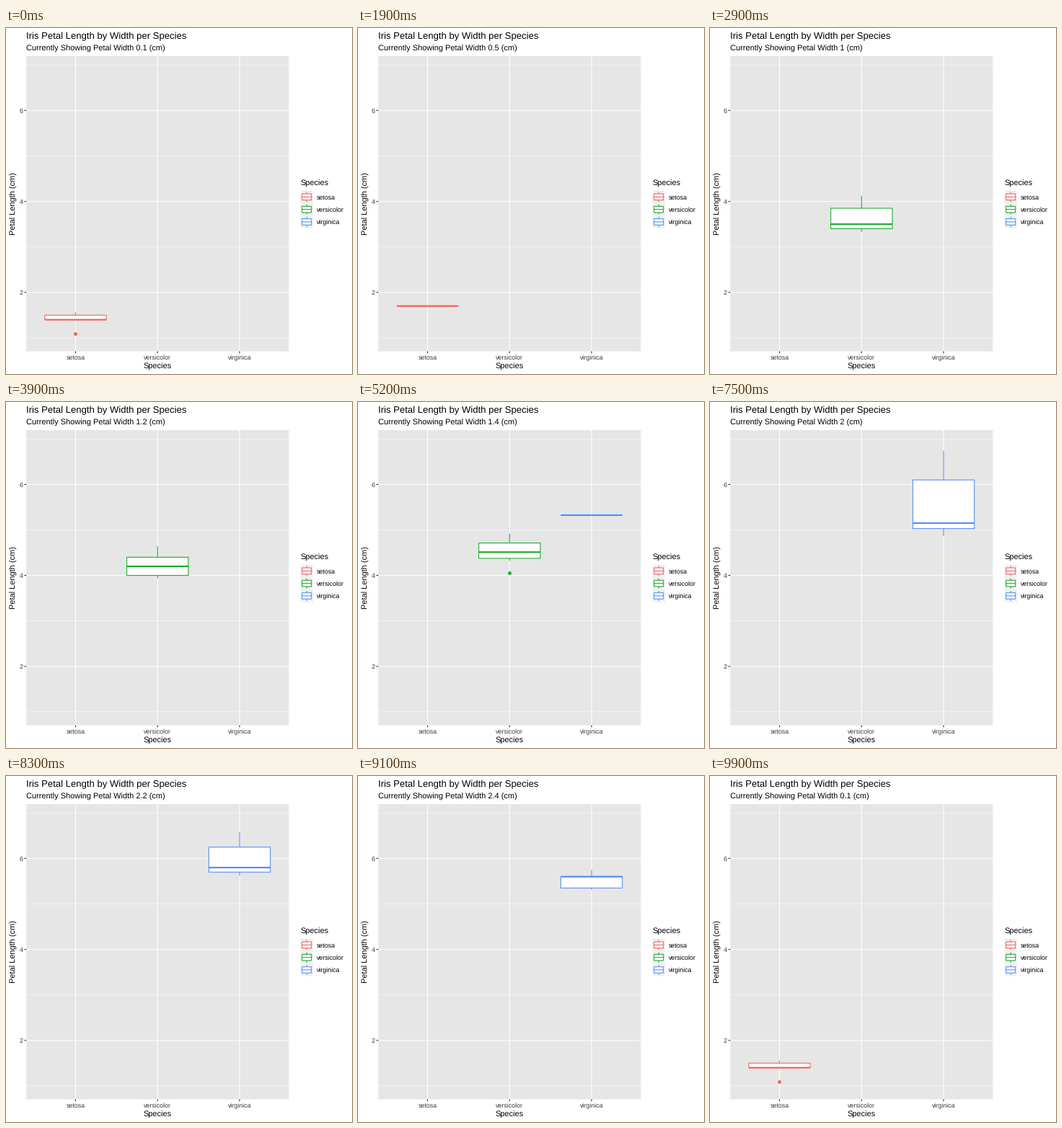
These frames come from a looping animation (480 by 480 pixels, 10000 ms). A matplotlib script:

```python
import numpy as np
import matplotlib.pyplot as plt
from matplotlib.animation import FuncAnimation
from matplotlib.patches import Rectangle

plt.rcParams.update({"font.family": "Liberation Sans", "path.snap": False,
                     "text.hinting": "none", "toolbar": "None"})

SIZE, FRAMES, INTERVAL = 480, 100, 100
LINE = 1.07
LEFT, TOP, RIGHT, BOTTOM = 28.2, 39.0, 392.3, 448.5
Y_MIN, Y_MAX = 0.705, 7.195
STEP_X = (RIGHT - LEFT) / 3.2
BOX_WIDTH = 0.75 * STEP_X
TITLE, BODY, SMALL = 13.15, 10.97, 8.9
COLORS = {"setosa": "#f1635a", "versicolor": "#16ac2a", "virginica": "#538dfb"}

# Key boxes by petal width in tenths of a cm: (q1, median, q3) or one flat value
KEY_BOXES = {
    "setosa": {1: (1.4, 1.4, 1.5), 3: (1.4, 1.4, 1.5), 5: 1.7, 6: 1.6},
    "versicolor": {10: (3.4, 3.5, 3.85), 12: (4.0, 4.2, 4.4),
                   16: (4.6, 4.7, 4.9), 17: 5.0, 18: 4.8},
    "virginica": {14: 5.6, 15: 5.05, 16: 5.8, 17: 4.5, 18: (4.9, 5.5, 5.7),
                  19: (5.1, 5.1, 5.3), 20: (5.03, 5.15, 6.1),
                  22: (5.7, 5.8, 6.25), 24: (5.35, 5.6, 5.6), 25: (5.85, 6.0, 6.05)},
}
OUTLIERS = {
    "setosa": {1: [1.1], 2: [1.0, 1.2, 1.7, 1.9], 3: [1.7], 4: [1.9]},
    "versicolor": {14: [3.9], 15: [4.2]},
    "virginica": {19: [6.1], 21: [6.6]},
}
WIDTHS = [*range(1, 7), *range(10, 26)]
# Frames that lie halfway between two petal widths
TWEENS = [*range(3, 49, 5), 52, 57, *range(62, 99, 4)]


def x_pos(index):
    return LEFT + (0.6 + index) * STEP_X


def y_pos(value):
    return BOTTOM - (np.asarray(value) - Y_MIN) / (Y_MAX - Y_MIN) * (BOTTOM - TOP)


def box_at(name, width):
    """Return (low, q1, median, q3, high) and outliers, or None outside the range."""
    keys = KEY_BOXES[name]
    widths = list(keys)
    if not widths[0] <= width <= widths[-1]:
        return None
    boxes = np.array([np.broadcast_to(box, 3) for box in keys.values()])
    q1, median, q3 = (np.interp(width, widths, column) for column in boxes.T)
    iqr = q3 - q1
    box = np.array([q1 - 0.15 * iqr, q1, median, q3, q3 + 0.6 * iqr])
    return box, np.array(OUTLIERS[name].get(width, []))


def halfway(start, end):
    (box_a, dots_a), (box_b, dots_b) = start, end
    if len(dots_a) and len(dots_b):
        dots_a = (dots_a + np.resize(dots_b, len(dots_a))) / 2
    return (box_a + box_b) / 2, dots_a


fig = plt.figure(figsize=(SIZE / 72, SIZE / 72), dpi=72, facecolor="white")
ax = fig.add_axes([0, 0, 1, 1])
ax.set(xlim=(0, SIZE), ylim=(SIZE, 0))
ax.axis("off")


def line(x0, y0, x1, y1, color, width=LINE):
    return ax.plot([x0, x1], [y0, y1], color=color, lw=width,
                   solid_capstyle="butt")[0]


def rect(x0, y0, x1, y1, face, edge="none"):
    return ax.add_patch(Rectangle((x0, y0), x1 - x0, y1 - y0, facecolor=face,
                                  edgecolor=edge, lw=LINE, zorder=2))


def label(x, y, text, size, color="black", **kwargs):
    return ax.text(x, y, text, fontsize=size, color=color, va="baseline", **kwargs)


def draw_key(x, y, color, side=17.28):
    half = side / 2
    rect(x - half, y - half, x + half, y + half, "#efefef")
    for sign in (-1, 1):
        line(x, y + sign * side * 0.25, x, y + sign * side * 0.4, color)
    dx, dy = side * 0.375, side * 0.25
    rect(x - dx, y - dy, x + dx, y + dy, "white", color)
    line(x - dx, y, x + dx, y, color)


def draw_scene():
    rect(LEFT, TOP, RIGHT, BOTTOM, "#e6e6e6")
    for value in (1, 3, 5, 7):
        line(LEFT, y_pos(value), RIGHT, y_pos(value), "white", LINE / 2)
    for value in (2, 4, 6):
        y = y_pos(value)
        line(LEFT, y, RIGHT, y, "white")
        line(LEFT - 2.74, y, LEFT, y, "#262626")
        label(23.3, y + 3.3, str(value), SMALL, "#3c3c3c", ha="right")
    for i, (name, color) in enumerate(COLORS.items()):
        x = x_pos(i)
        line(x, TOP, x, BOTTOM, "white")
        line(x, BOTTOM, x, BOTTOM + 2.74, "#262626")
        label(x, 460, name, SMALL, "#3c3c3c", ha="center")
        draw_key(417.2, 234.4 + 17.28 * i, color)
        label(431, 238 + 17.28 * i, name, SMALL)
    label(28.2, 15, "Iris Petal Length by Width per Species", TITLE)
    label(210.2, 473, "Species", BODY, ha="center")
    label(408.3, 219, "Species", BODY)
    label(13.5, 243.6, "Petal Length (cm)", BODY, rotation=90,
          rotation_mode="anchor", ha="center")


def draw_box(x, stats, color):
    box, outliers = stats
    low, q1, median, q3, high = y_pos(box)
    x0, x1 = x - BOX_WIDTH / 2, x + BOX_WIDTH / 2
    dots = ax.plot(np.full(len(outliers), x), y_pos(outliers), "o", ms=4.9,
                   color=color, mew=0)[0]
    return [dots,
            line(x, q3, x, high, color),
            line(x, q1, x, low, color),
            rect(x0, q3, x1, q1, "white", color),
            line(x0, median, x1, median, color, 2 * LINE)]


draw_scene()
subtitle = label(28.2, 32, "", BODY)
drawn = []


def update(frame):
    while drawn:
        drawn.pop().remove()
    state = sum(start <= frame for start in TWEENS)
    target = WIDTHS[state % len(WIDTHS)]
    shown = WIDTHS[state - 1] if frame in TWEENS else target
    subtitle.set_text(f"Currently Showing Petal Width {shown / 10:g} (cm)")
    for i, (name, color) in enumerate(COLORS.items()):
        start, end = box_at(name, shown), box_at(name, target)
        if start and end:
            drawn.extend(draw_box(x_pos(i), halfway(start, end), color))
    return [subtitle, *drawn]


anim = FuncAnimation(fig, update, frames=FRAMES, interval=INTERVAL,
                     repeat=True, repeat_delay=0, blit=False)
plt.show()
```
